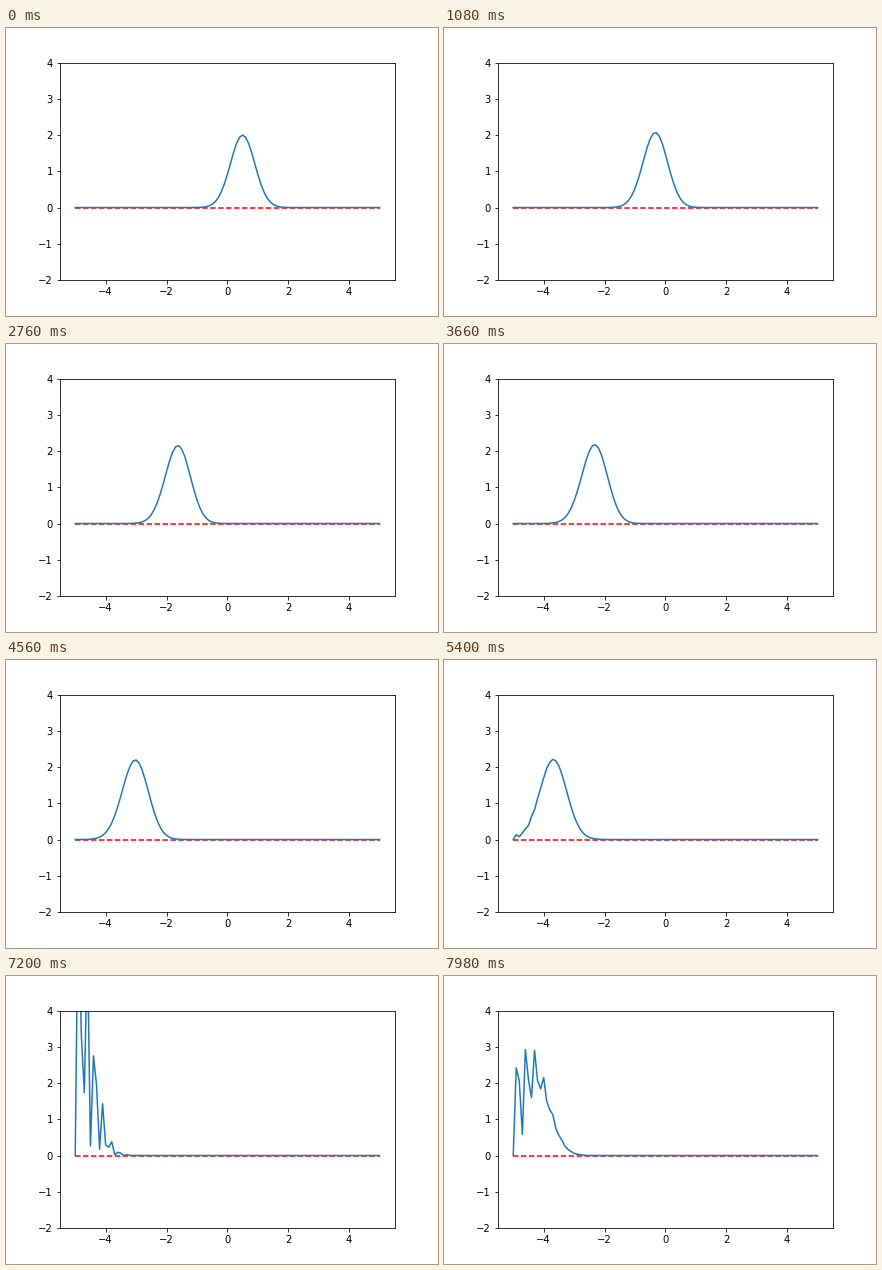
A matplotlib script for the animation above (8 s loop, 432 px wide and 288 px high).

```python
import numpy as np
import matplotlib.pyplot as plt
from matplotlib.animation import FuncAnimation

# Wave packet in a box, advanced with explicit Euler steps
DX = 0.1
DT = 1e-4
STEPS = 50        # Euler steps per pose
POSES = 134
TICK = 20         # ms
HOLD = 3          # ticks per pose

X0, SIGMA, K0, PEAK = 0.5, 0.4, -12.1, 2.0

x = np.linspace(-5, 5, 101)


def densities():
    psi = np.sqrt(PEAK) * np.exp(-(x - X0) ** 2 / (4 * SIGMA ** 2) + 1j * K0 * x)
    psi[0] = psi[-1] = 0
    rows = []
    for _ in range(POSES):
        rows.append(np.abs(psi) ** 2)
        for _ in range(STEPS):
            lap = psi[2:] - 2 * psi[1:-1] + psi[:-2]
            psi[1:-1] += 0.5j * DT / DX ** 2 * lap
    return rows


rho = densities()

fig, ax = plt.subplots(figsize=(6, 4), dpi=72)
fig.subplots_adjust(left=0.125, right=0.9, bottom=0.125, top=0.88)
ax.plot(x, 0 * x, "r--")
wave, = ax.plot(x, rho[0], color="C0")
ax.set_xlim(-5.5, 5.5)
ax.set_ylim(-2, 4)


def update(n):
    wave.set_ydata(rho[n // HOLD])
    return wave,


anim = FuncAnimation(fig, update, frames=400, interval=TICK, repeat=True)
plt.show()
```
